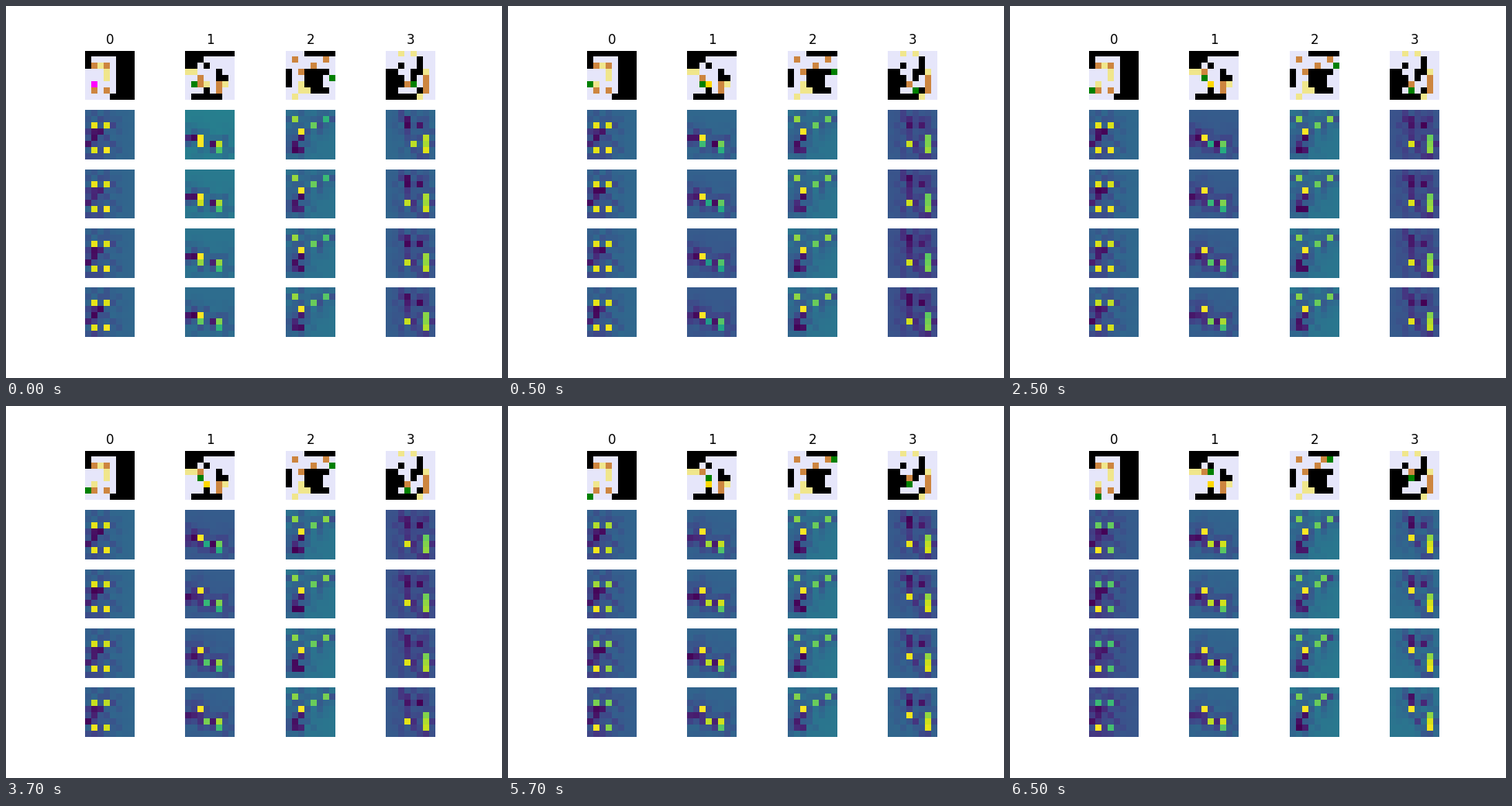
A matplotlib script for the animation above (8 s loop, 640x480 px).

```python
import numpy as np
import matplotlib.pyplot as plt
from matplotlib.animation import FuncAnimation
from matplotlib.colors import to_rgb

SIZE, MAPS = 8, 4
STEPS = 5 * MAPS
MOVES = {"U": (-1, 0), "D": (1, 0), "L": (0, -1), "R": (0, 1)}
ROWS, COLS = np.indices((SIZE, SIZE))

# walls: (row, col, height, width); sinks: the darkest cells of the heat maps
# base and glow: key levels of the background and of each box, spread over time
LEVELS = [
    dict(walls=[(0, 0, 1, 8), (1, 0, 2, 1), (1, 5, 6, 3), (7, 4, 1, 4)],
         goals=[(2, 2), (3, 3), (4, 3), (5, 1)],
         boxes=[(2, 1), (2, 3), (6, 1), (6, 3)],
         agent=(5, 2), moves="LLDDR",
         sinks=[(3, 1), (4, 1), (3, 2), (5, 0)],
         base=[.33, .34, .27],
         glow=[[.97, .96, .68], [.95, .94, .68], [.95, 1], [1, .98, .7]]),
    dict(walls=[(0, 0, 1, 8), (1, 0, 1, 3), (2, 0, 1, 2), (2, 3, 1, 1),
                (3, 5, 2, 1), (4, 6, 1, 1), (6, 3, 1, 1), (7, 1, 1, 5)],
         goals=[(3, 0), (3, 1), (5, 3), (5, 6)],
         boxes=[(4, 2), (5, 2), (5, 5), (6, 5)],
         agent=(4, 1), moves="DRURU",
         sinks=[(4, 0), (4, 1), (5, 4)],
         base=[.43, .28, .32, .33],
         glow=[[1], [1, .5, .9, .9], [.9, .72, .93, .93], [.72, .57, .74, .75]]),
    dict(walls=[(0, 3, 1, 5), (3, 0, 3, 1), (3, 3, 1, 4), (4, 3, 2, 3), (6, 4, 1, 3)],
         goals=[(5, 2), (6, 2), (6, 3), (7, 1)],
         boxes=[(1, 1), (1, 6), (2, 4), (3, 2)],
         agent=(5, 7), moves="UUUUL",
         sinks=[(5, 1), (6, 1), (6, 2), (4, 2)],
         base=[.38, .4],
         glow=[[.85, .8], [.65, .84, .78, .78], [.77], [1]]),
    dict(walls=[(1, 5, 3, 1), (3, 4, 2, 1), (2, 2, 1, 1), (3, 0, 1, 2), (4, 0, 2, 3),
                (6, 0, 1, 2), (6, 5, 1, 1), (7, 0, 1, 5)],
         goals=[(0, 2), (0, 4), (3, 6), (7, 5)],
         boxes=[(5, 4), (4, 6), (5, 6), (6, 6)],
         agent=(5, 5), moves="LDLUU",
         sinks=[(1, 3), (2, 3), (2, 5)],
         base=[.34, .26, .3, .39],
         glow=[[.9, 1], [.9, .74, .84, .83], [.87, .77, .92, .94], [.95, .8, .95, .98]]),
]


def wall_mask(level):
    mask = np.zeros((SIZE, SIZE), bool)
    for r, c, h, w in level["walls"]:
        mask[r:r + h, c:c + w] = True
    return mask


def play(level):
    """States (agent, boxes) before the first move and after each one."""
    agent, boxes = level["agent"], list(level["boxes"])
    states = [(agent, list(boxes))]
    for move in level["moves"]:
        dr, dc = MOVES[move]
        agent = (agent[0] + dr, agent[1] + dc)
        if agent in boxes:
            boxes[boxes.index(agent)] = (agent[0] + dr, agent[1] + dc)
        states.append((agent, list(boxes)))
    return states


def draw_board(level, state):
    agent, boxes = state
    goals = level["goals"]
    board = np.full((SIZE, SIZE, 3), to_rgb("lavender"))
    board[wall_mask(level)] = to_rgb("black")
    for cell in goals:
        board[cell] = to_rgb("khaki")
    for cell in boxes:
        board[cell] = to_rgb("gold" if cell in goals else "peru")
    board[agent] = to_rgb("magenta" if agent in goals else "green")
    return board


def over_time(keys, step):
    return np.interp(step, np.linspace(0, STEPS - 1, len(keys)), keys)


def draw_heat(level, boxes, step, seed):
    fixed = np.random.default_rng(seed).random((SIZE, SIZE))
    rng = np.random.default_rng(100 * seed + step)
    texture = .75 * fixed + .25 * rng.random((SIZE, SIZE))
    base = over_time(level["base"], step)

    # the texture fades with the distance to the nearest hot or dark cell
    centres = boxes + level["sinks"]
    distance = np.min([np.hypot(ROWS - r, COLS - c) for r, c in centres], axis=0)
    heat = base - .22 * texture ** 1.5 * np.exp(-(distance / 2) ** 2)

    for cell in level["boxes"]:
        heat[cell] = .45 * base
    for cell in level["sinks"]:
        heat[cell] = rng.uniform(0, .13)
    for cell, keys in zip(boxes, level["glow"]):
        heat[cell] = over_time(keys, step)
    return heat


games = [play(level) for level in LEVELS]
fig, axes = plt.subplots(1 + MAPS, len(LEVELS), figsize=(6.4, 4.8), dpi=100)
images = np.empty(axes.shape, object)
for (row, col), ax in np.ndenumerate(axes):
    ax.axis("off")
    images[row, col] = ax.imshow(np.zeros((SIZE, SIZE)), cmap="viridis", vmin=0, vmax=1)
    if row == 0:
        ax.set_title(str(col))


def update(frame):
    turn = (frame + 3) // 4
    for col, (level, states) in enumerate(zip(LEVELS, games)):
        images[0, col].set_data(draw_board(level, states[turn + 1]))
        for k in range(MAPS):
            # the first map of a turn still shows the boxes before the move
            boxes = states[turn + (k > 0)][1]
            heat = draw_heat(level, boxes, MAPS * turn + k, col + 1)
            images[k + 1, col].set_data(heat)
    return list(images.flat)


anim = FuncAnimation(fig, update, frames=16, interval=500, repeat=True, repeat_delay=0)
plt.show()
```
